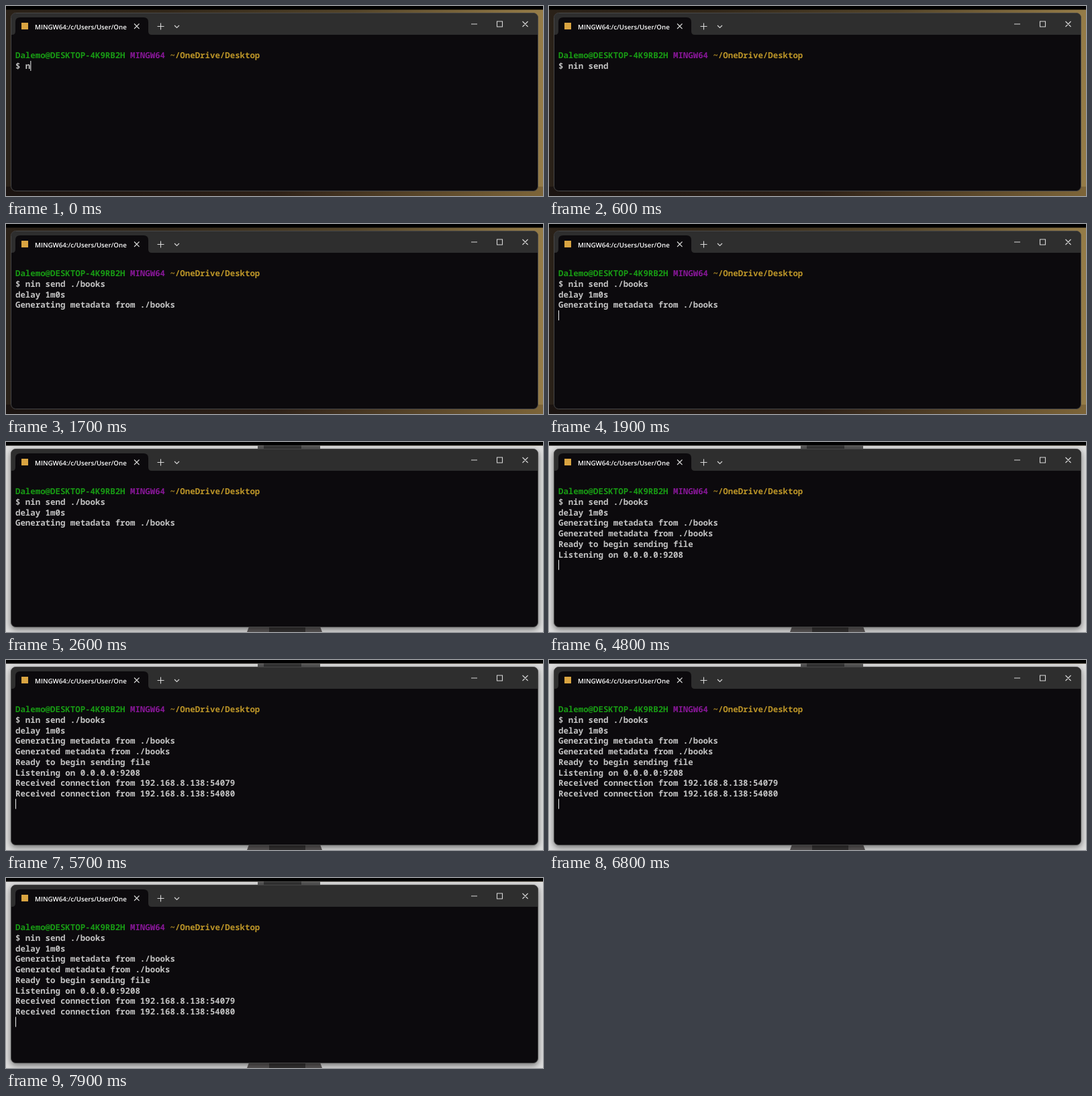
Recreate the animation shown at these times as an HTML page. Size 800 by 284 pixels, loop 8000 ms.

```html
<!DOCTYPE html>
<html lang="en">
<head>
<meta charset="utf-8">
<title>Terminal</title>
<style>
  html, body { margin: 0; width: 100%; height: 100%; overflow: hidden; background: #000; }
  svg { display: block; width: 800px; height: 284px; }
  .term { font: 600 12.4px "Noto Sans Mono", "DejaVu Sans Mono", monospace; fill: #c4c4c4; text-rendering: geometricPrecision; }
  .tab { font: 600 9.7px "Open Sans", "Noto Sans", sans-serif; fill: #fff; text-rendering: geometricPrecision; }
  .icon { fill: none; stroke: #d8d8d8; stroke-width: 1.1; }
</style>
</head>
<body>
<svg viewBox="0 0 800 284">
  <defs>
    <linearGradient id="gold">
      <stop offset="0" stop-color="#2a2118"/>
      <stop offset=".3" stop-color="#33281a"/>
      <stop offset=".65" stop-color="#54452a"/>
      <stop offset="1" stop-color="#957c48"/>
    </linearGradient>
    <linearGradient id="dusk">
      <stop offset="0" stop-color="#1b1411"/>
      <stop offset=".5" stop-color="#2e2118"/>
      <stop offset="1" stop-color="#7d6539"/>
    </linearGradient>
    <filter id="blur" x="-10%" y="-10%" width="120%" height="120%">
      <feGaussianBlur stdDeviation="5"/>
    </filter>
    <clipPath id="desk"><rect y="5.500" width="800" height="279"/></clipPath>
  </defs>

  <g clip-path="url(#desk)">
    <rect width="800" height="284" fill="url(#gold)"/>
    <rect y="270" width="800" height="14" fill="url(#dusk)"/>
    <g id="light">
      <rect width="800" height="284" fill="#dedede"/>
      <path d="M375 5h93v6h-93z" fill="#565656"/>
      <path d="M384 5h56v6h-56z" fill="#333"/>
      <path d="M362 276h106l3 8H359z" fill="#5c5858"/>
      <path d="M392 276h54v8h-54z" fill="#363333"/>
      <rect x="7" y="13" width="786" height="267" rx="7" opacity=".5" filter="url(#blur)"/>
    </g>
  </g>

  <rect x="7.5" y="10.5" width="785" height="266" rx="7" fill="#0c0a0d"/>
  <path d="M8 43V18q0-7 7-7H785q7 0 7 7V43z" fill="#2e2e2e"/>
  <path d="M9 43q5 0 5-5V24q0-7 7-7H205q7 0 7 7V38q0 5 5 5z" fill="#0c0a0d"/>
  <rect x="7.5" y="10.5" width="785" height="266" rx="7" fill="none" stroke="#484848"/>

  <rect x="23" y="25" width="10" height="10" fill="#d9a441"/>
  <text class="tab" x="43" y="34.600">MINGW64:/c/Users/User/One</text>
  <path class="icon" d="M191 26.500l7.500 7.500m0-7.500l-7.500 7.500M225.500 30.500h10m-5-5v10M251 29l3.500 3.500 3.500-3.500
    M693 27h9M731.500 23h8v8h-8zM769.500 23l8 8m0-8l-8 8"/>

  <g class="term">
    <text x="14" y="78.300"><tspan fill="#189c14">Dalemo@DESKTOP-4K9RB2H</tspan> <tspan fill="#881798">MINGW64</tspan> <tspan fill="#bd9628">~/OneDrive/Desktop</tspan></text>
    <g id="output"></g>
  </g>
  <rect id="cursor" width="1" height="15" fill="#eee"/>
</svg>
<script>
const LOOP = 8000, LEFT = 14, CHAR = 7.44, ROW = 15.7;
const command = "nin send ./books";
const typedAt = 1400;

// [time shown in ms, text]
const log = [
  [1500, "delay 1m0s"],
  [1500, "Generating metadata from ./books"],
  [3000, "Generated metadata from ./books"],
  [3000, "Ready to begin sending file"],
  [3000, "Listening on 0.0.0.0:9208"],
  [5000, "Received connection from 192.168.8.138:54079"],
  [5000, "Received connection from 192.168.8.138:54080"]
];

const byId = id => document.getElementById(id);
const output = byId("output"), cursor = byId("cursor"), light = byId("light");

const rows = [command, ...log].map((_, i) => {
  const row = document.createElementNS("http://www.w3.org/2000/svg", "text");
  row.setAttribute("x", LEFT);
  row.setAttribute("y", 78.3 + ROW * (i + 1));
  return output.appendChild(row);
});

function draw(t) {
  const prompt = "$ " + command.slice(0, 1 + Math.floor(t * 7 / 600));
  rows[0].textContent = prompt;
  log.forEach(([time, text], i) => rows[i + 1].textContent = t >= time ? text : "");

  const shown = log.filter(([time]) => t >= time).length;
  const entered = t >= typedAt;
  cursor.setAttribute("x", LEFT + (entered ? 0 : prompt.length * CHAR));
  cursor.setAttribute("y", 82 + ROW * (entered ? shown + 1 : 0));

  // The blink restarts when the file is ready
  const phase = t < 3000 ? t + 235 : t - 235;
  cursor.style.opacity = phase % 1060 < 530 ? 1 : 0;

  light.style.opacity = Math.min(1, Math.max(0, (t - 1900) / 600));
}

function frame() {
  draw(performance.now() % LOOP);
  requestAnimationFrame(frame);
}
frame();
</script>
</body>
</html>
```
